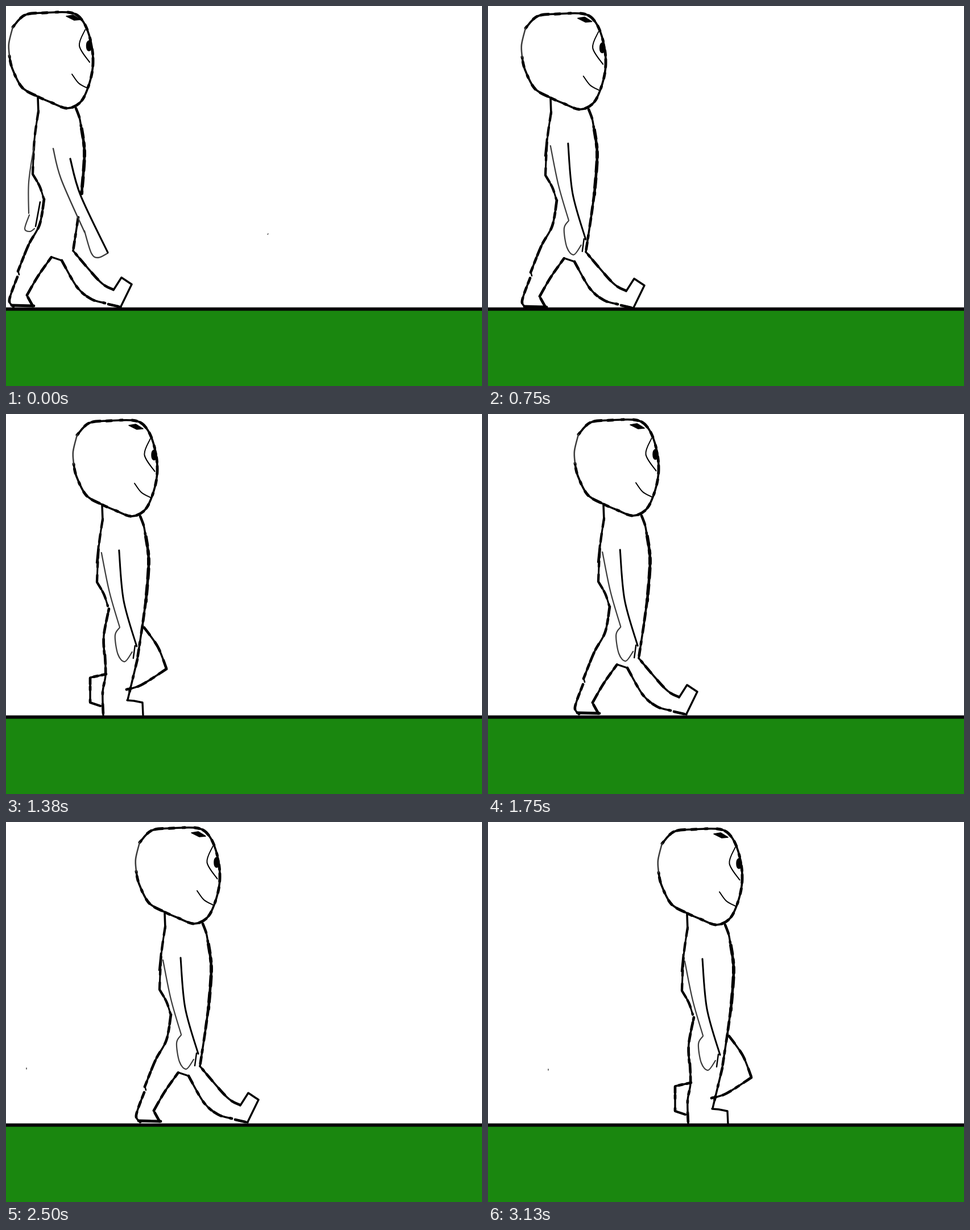
Animation, 837 px wide and 669 px high, one loop 3260 ms. Source, as an HTML page:

```html
<!DOCTYPE html>
<html lang="en">
<head>
<meta charset="utf-8">
<title>Walking sketch</title>
<style>
  html, body { margin: 0; width: 100%; height: 100%; overflow: hidden; background: #fff; }
  svg { display: block; width: 837px; height: 669px; }
  path { fill: none; stroke: #000; stroke-linecap: round; stroke-linejoin: round; }
  .solid { fill: #000; }
</style>
</head>
<body>
<svg viewBox="0 0 837 669">
  <rect y="536" width="837" height="133" fill="#1a870f"/>
  <rect y="530.6" width="837" height="5.9" fill="#050505"/>
  <g id="man">
    <g id="body"></g>
    <g id="face"></g>
    <g id="eye"></g>
    <g id="stride"></g>
    <g id="pass"></g>
    <g id="hip"></g>
    <g id="swing"></g>
    <g id="hang"></g>
  </g>
</svg>
<script>
const $ = id => document.getElementById(id);
const GREY = '#3c3c3c';

let seed = 7;
const random = () => (seed = seed * 16807 % 2147483647) / 2147483647;

// Smooth path through "x,y x,y ..." points
function curve(text) {
  const p = text.split(' ').map(s => s.split(',').map(Number));
  let d = 'M' + p[0];
  for (let i = 0; i < p.length - 1; i++) {
    const a = p[i - 1] || p[i], b = p[i], c = p[i + 1], e = p[i + 2] || c;
    d += `C${b[0] + (c[0] - a[0]) / 6},${b[1] + (c[1] - a[1]) / 6} ` +
         `${c[0] - (e[0] - b[0]) / 6},${c[1] - (e[1] - b[1]) / 6} ${c}`;
  }
  return d;
}

function draw(group, d, width, color = '#000', extra = {}) {
  const el = document.createElementNS('http://www.w3.org/2000/svg', 'path');
  const attrs = { d, 'stroke-width': width, style: `stroke:${color}`, ...extra };
  for (const k in attrs) el.setAttribute(k, attrs[k]);
  $(group).append(el);
}

const line = (group, points, width = 3.2, color) => draw(group, curve(points), width, color);
const corners = (group, points) => draw(group, 'M' + points, 3.4);
const solid = (group, d) => draw(group, d, 1.5, '#000', { class: 'solid' });

// Pen line with uneven weight
function ink(group, points, width = 3.4) {
  const dashes = Array.from({ length: 8 }, () => 4 + Math.round(random() * 14));
  line(group, points, width);
  draw(group, curve(points), width + 1.3, '#000', { 'stroke-dasharray': dashes.join(' ') });
}

ink('body', '12,37 33,16 68,12 115,12 136,28 149,62 153,100 147,135 132,168 108,180 80,170 55,159 28,143 11,110 6,88', 3.6);
line('body', '12,37 5,66 6,88', 2.6, GREY);
line('body', '56,161 57,188', 3.6);
ink('body', '57,185 50,235 47,295', 3);
ink('body', '47,296 59,317 66,338', 3);
ink('body', '123,180 129,196 132,212', 3.3);
ink('body', '133,216 138,260 133,330', 4.6);
ink('body', '127,372 118,431');

solid('face', 'M106,18L118,16L131,24L120,25Z');
line('face', '116,120 128,136 144,145', 2);
line('eye', '139,42 129,70 147,99', 2);
solid('eye', 'M146,61C152,62 152,78 146,79C140,78 140,63 146,61Z');

// Legs apart
ink('stride', '67,340 59,385 40,420 21,467');
line('stride', '21,465 23,473', 2.6);
ink('stride', '20,477 6,517 13,529');
line('stride', '10,527 49,528', 4.8);
ink('stride', '47,528 37,510');
ink('stride', '37,509 56,476 80,442');
corners('stride', '80,442 98,448');
ink('stride', '98,448 125,495 150,516 174,523');
ink('stride', '180,525 202,530');
corners('stride', '202,529 221,490 203,478 189,500');
ink('stride', '188,499 165,485 118,431');

// Legs together
ink('pass', '68,343 59,390 60,423');
ink('pass', '61,424 62,460 57,490 58,530');
ink('pass', '118,432 101,503');
corners('pass', '100,504 112,505 127,508 128,530');
ink('pass', '63,458 35,464');
ink('pass', '35,465 35,507');
line('pass', '35,508 53,514', 4);
ink('pass', '130,376 154,410 169,448');
ink('pass', '169,449 125,477 99,485');

// Arm swung forward, other hand behind
line('swing', '83,251 97,305 138,398', 2.4, GREY);
line('swing', '138,396 150,435 162,443 179,435', 2.3, GREY);
line('swing', '113,269 131,333 179,434');
line('swing', '49,248 40,310 40,365', 2.2, GREY);
line('swing', '41,368 33,392 42,397 50,392', 2.2, GREY);
line('swing', '52,388 60,345', 2.6);
line('swing', '461,401 460,402', 1.5, GREY);

// Arm hanging at the side
ink('hip', '133,328 127,372', 3.6);
line('hip', '49,232 46,262', 2.4);
line('hang', '55,244 69,313 87,375', 2.2, GREY);
line('hang', '87,376 79,390 84,423 96,436 109,419', 2.2, GREY);
line('hang', '86,240 94,328 117,409', 3);
line('hang', '114,408 111,430', 2.4);
line('hang', '-185,434 -185,436', 1.5, GREY);

const STEP = 125, LAST = 25, LOOP = 3260;
// Step, x, y where the pace changes
const pace = [[0, 0, 0], [6, 54, 2], [8, 79, 0], [18, 192, -1], [22, 254, -1], [25, 294, 1]];
const swings = [0, 5, 10, 16, 22];

function place(i) {
  const n = Math.max(1, pace.findIndex(k => k[0] >= i));
  const a = pace[n - 1], b = pace[n], u = (i - a[0]) / (b[0] - a[0]);
  return [1, 2].map(k => Math.round(a[k] + (b[k] - a[k]) * u));
}

const show = (id, on) => { $(id).style.display = on ? '' : 'none'; };
const move = (id, x, y) => $(id).setAttribute('transform', `translate(${x} ${y})`);

function pose(i) {
  const swung = swings.includes(i), apart = i % 2 === 0;
  const settle = Math.min(1, i / 8);
  move('man', ...place(i));
  move('face', -3 * settle, 2 * settle);
  move('eye', 1.5 * settle, 2 * settle);
  move('swing', 3 * i / LAST, i / LAST);
  move('hang', 2 - i / 5, 0);
  show('stride', apart);
  show('pass', !apart);
  show('swing', swung);
  show('hang', !swung);
  show('hip', !swung);
}

let last = -1;
function tick() {
  const t = performance.now() % LOOP;
  const i = Math.min(LAST, Math.floor((t + 1) / STEP));
  if (i !== last) pose(last = i);
  requestAnimationFrame(tick);
}
tick();
</script>
</body>
</html>
```
